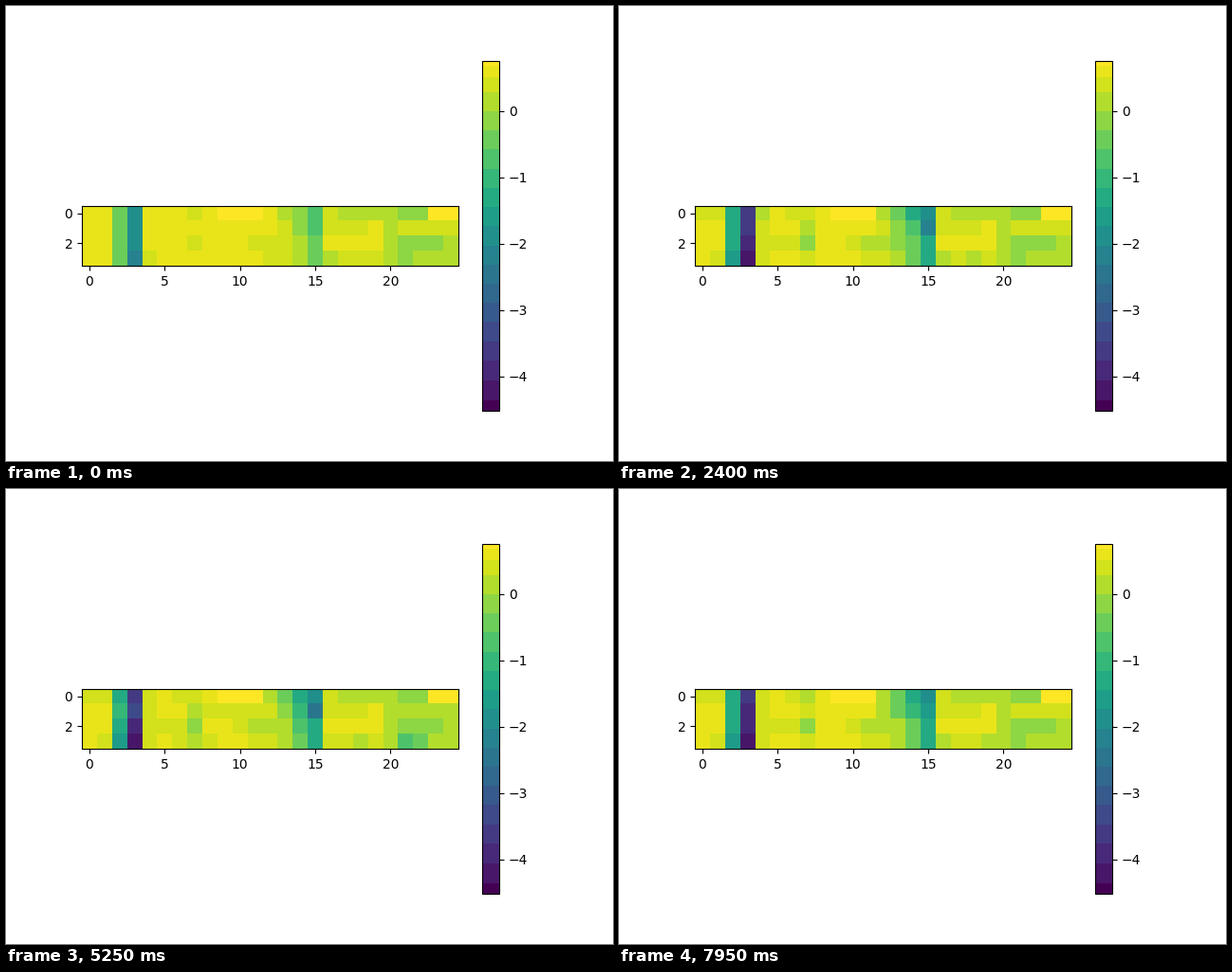
Animation, 640 px wide and 480 px high, one loop 8000 ms. Source, as a matplotlib script:

```python
import numpy as np
import matplotlib.pyplot as plt
from matplotlib.animation import FuncAnimation
from matplotlib.colors import ListedColormap

ROWS, COLS = 4, 25
VMIN, VMAX = -4.52, 0.76
TICK_MS, STEP_TICKS, LOOP_MS = 50, 3, 8000
BANDS, SCALE_PX = 20, 369.6
COL = np.arange(COLS)

# Colour bands widen down from the top of the scale, then keep one height.
k = np.arange(BANDS + 1)
EDGES = np.where(k < 4, 53 * (k / 4) ** 1.6, 53 + 20.3 * (k - 4)) / SCALE_PX
EDGES[-1] = 1
CENTERS = (EDGES[:-1] + EDGES[1:]) / 2
VALUES = VMAX - CENTERS * (VMAX - VMIN)

# Shallow features: first column, last column, extra depth in bands.
SHARED_SPANS = [(4, 4, 0.7), (7, 7, 1.3), (20, 24, 1.7)]
ROW_SPANS = [
    [(0, 1, 0.8), (6, 6, 0.8), (9, 11, -1.2), (16, 16, 0.8), (17, 19, 1.7),
     (21, 22, 0.9), (23, 24, -2.9)],
    [(16, 18, 0.9), (21, 24, -0.9)],
    [(5, 6, 0.9), (7, 7, 1.5), (10, 12, 0.8), (11, 11, 0.9), (21, 23, 1.1)],
    [(1, 1, 0.6), (11, 12, 0.6), (16, 19, 1.2), (21, 21, 0.8)],
]
PULSE_SPANS = {1: [(7, 11, 0.8), (21, 24, 1.8)], 3: [(6, 8, 1.0), (21, 22, 3.0)]}


def add_spans(row, spans, weight=1.0):
    for first, last, depth in spans:
        row[first:last + 1] += weight * depth


def smoothstep(u):
    u = np.clip(u, 0, 1)
    return u * u * (3 - 2 * u)


def wave(step, peak, period):
    return np.cos(2 * np.pi * (step - peak) / period)


def bands_at(step):
    drift = wave(step, 28, 44)
    pulse = max(0, wave(step, 8, 31))
    growth = 1 - 0.4 * (1 - min(step / 8, 1)) ** 1.5

    # A narrow dip near column 3 and a ramp that breaks off after column 15.
    dip_scale = [0.96, 0.93 - 0.09 * drift, 1.04, 1.09]
    ramp_depth = [9.2, 9.7 + 1.6 * drift, 6.7, 6.7]
    ramp_power = [1.2, 2.1 - 1.1 * smoothstep((step - 36) / 12), 1.6, 1.9]
    dip = 19.5 * np.exp(-((COL - 2.68) / 0.67) ** 2)
    ramp = np.where(COL <= 15, np.clip((COL - 11) / 4, 0, 1), 0)

    depth = np.full((ROWS, COLS), 1.2)
    for r in range(ROWS):
        depth[r] += dip_scale[r] * dip + ramp_depth[r] * ramp ** ramp_power[r]
        add_spans(depth[r], SHARED_SPANS + ROW_SPANS[r])
        add_spans(depth[r], PULSE_SPANS.get(r, []), pulse)
    depth[:, :16] *= growth
    depth += np.random.default_rng(step).normal(0, 0.12, depth.shape)
    return np.clip(np.rint(depth), 0, BANDS - 1).astype(int)


def banded_viridis():
    viridis = plt.get_cmap("viridis")
    colors = viridis(1 - CENTERS)
    colors[0], colors[-1] = viridis(1.0), viridis(0.0)
    position = 1 - (np.arange(256) + 0.5) / 256
    return ListedColormap(colors[np.searchsorted(EDGES, position, side="right") - 1])


plt.rcParams["font.family"] = "DejaVu Sans"
fig, ax = plt.subplots(figsize=(6.4, 4.8), dpi=100)
image = ax.imshow(VALUES[bands_at(0)], cmap=banded_viridis(),
                  vmin=VMIN, vmax=VMAX, interpolation="nearest")
ax.set_xticks(range(0, COLS, 5))
ax.set_yticks([0, 2])
fig.colorbar(image, ax=ax, ticks=range(-4, 1))


def update(tick):
    image.set_data(VALUES[bands_at(tick // STEP_TICKS)])
    return [image]


anim = FuncAnimation(fig, update, frames=LOOP_MS // TICK_MS, interval=TICK_MS,
                     repeat=True, repeat_delay=0)
plt.show()
```
